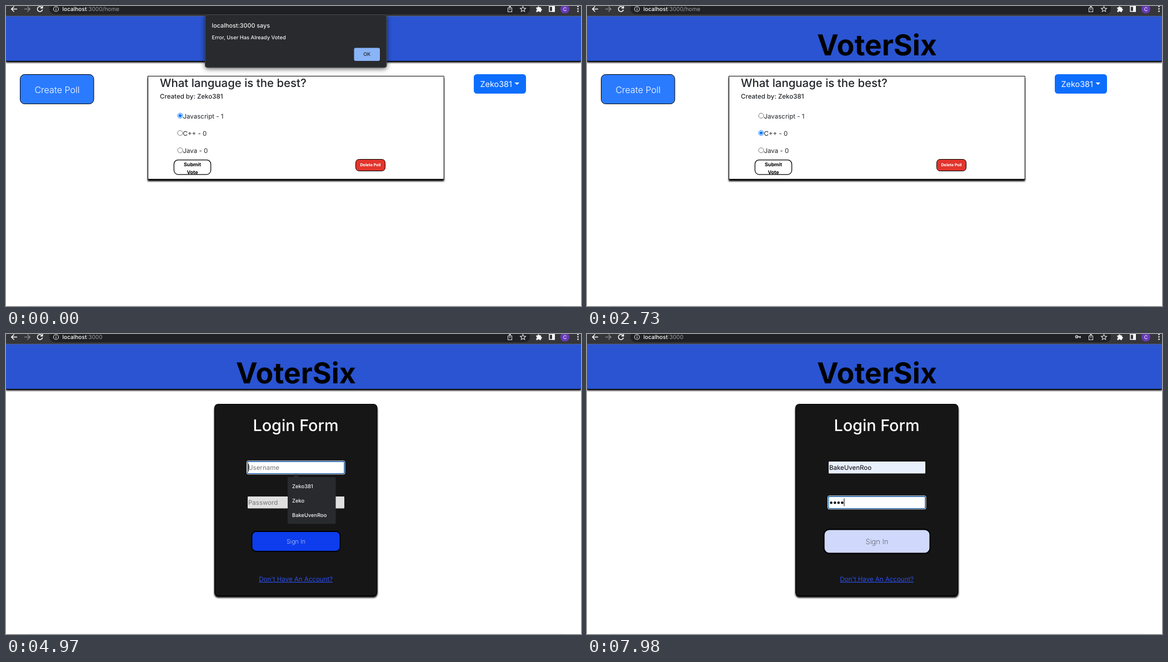
These frames come from a looping animation (1035x541 px, 8 s). An HTML page:

```html
<!DOCTYPE html>
<html lang="en">
<head>
<meta charset="utf-8">
<title>Poll app</title>
<style>
html, body { margin: 0; width: 100%; height: 100%; overflow: hidden; background: #fff; }
svg { display: block; font: 400 11.52px Inter, sans-serif; font-optical-sizing: none; text-rendering: geometricPrecision; }
text { fill: #212529; white-space: pre; }
.mid { text-anchor: middle; }
.shadow { filter: drop-shadow(0 3px 1.5px #000); }
.heading { font-weight: 500; }
.white { fill: #fff; }
.small { font-size: 7.2px; font-weight: 700; }
.menu text { font-size: 9.36px; font-weight: 500; fill: #f4f4f4; }
.line { fill: none; stroke: #dfe1e5; stroke-width: 1.5; }
.hint { fill: #757575; }
</style>
</head>
<body>
<svg width="1035" height="541" viewBox="0 0 1035 541">
  <rect width="1035" height="541" fill="#fff"/>
  <path d="M42 540.5H1002" stroke="#f1f1f1"/>

  <!-- browser bar -->
  <rect width="1035" height="18.5" fill="#35363a"/>
  <rect y="17.5" width="1035" height="1" fill="#4b4c50"/>
  <rect x="78" y="-5" width="865" height="20" rx="10" fill="#202124"/>
  <g class="line">
    <path d="M20 5.5H10M14.5 .8L9.8 5.5L14.5 10.2" stroke="#fff"/>
    <path d="M33 5.5H43M38.5 .8L43.2 5.5L38.5 10.2" stroke="#85878a"/>
    <path d="M64.8 2.8A4.6 4.6 0 1 0 65.6 6.5M65.8 0V3.8H62" stroke="#fff"/>
    <g stroke-width="1.1">
      <circle cx="90" cy="5.5" r="4.5"/>
      <path d="M90 4.8V8.2M90 2.6V3.8M905.2 3.5H903.5V10.5H910.5V3.5H908.8M907 7.5V.5M904.8 2.5L907 .3L909.2 2.5"/>
      <path d="M930.5 .6L931.9 3.9L935.5 4.2L932.8 6.5L933.6 10L930.5 8.1L927.4 10L928.2 6.5L925.5 4.2L929.1 3.9Z"/>
    </g>
    <rect x="978" y=".7" width="9" height="9" stroke="#fff"/>
  </g>
  <path class="white" d="M983 0H988V10.5H983ZM954.5 2.5H957A1.7 1.7 0 0 1 960.4 2.5H963V5A1.7 1.7 0 0 1 963 8.4V10.8H960.3A1.7 1.7 0 0 0 957 10.8H954.5V8.2A1.7 1.7 0 0 0 954.5 4.9Z"/>
  <circle cx="1006" cy="5.5" r="8" fill="#673ab7"/>
  <text class="mid white" x="1006" y="8.8" font-size="9">C</text>
  <path d="M1029.5 1V1.01M1029.5 5.3V5.31M1029.5 9.6V9.61" stroke="#fff" stroke-width="2.6" stroke-linecap="round"/>
  <g id="key" fill="none" stroke="#dfe1e5">
    <circle cx="881.5" cy="5" r="2" stroke-width="1.5"/>
    <path d="M883.5 5H889M887.5 5V7.5" stroke-width="1.6"/>
  </g>
  <text x="101.5" y="9" font-size="10.08" style="fill:#9aa0a6"><tspan fill="#fff" font-weight="500">localhost</tspan>:3000<tspan id="path">/home</tspan></text>

  <!-- page header -->
  <rect class="shadow" y="18.5" width="1035" height="80.5" fill="#2a54d1"/>
  <path d="M0 99.5H1035" stroke="#000"/>
  <text class="mid" x="522" y="89" font-size="51.84" font-weight="700" style="fill:#000">VoterSix</text>

  <g id="home">
    <rect x="25.5" y="123.5" width="132.5" height="53" rx="8" fill="#2b7bff" stroke="#000"/>
    <text class="mid white" x="92" y="157.3" font-size="16.13" font-weight="340">Create Poll</text>
    <rect x="842" y="123" width="94" height="35" rx="5.5" fill="#0d6efd"/>
    <text class="white" x="853.5" y="145.7" font-size="14.4">Zeko381</text>
    <path class="white" d="M915.5 138H924L919.75 142.3Z"/>
    <g id="logout">
      <rect x="842" y="158.5" width="115.5" height="35" rx="4" fill="#fff" stroke="#d3d4d6"/>
      <rect id="logoutRow" x="842" y="164" width="115.5" height="24" fill="#0d6efd"/>
      <text x="853.5" y="180" text-decoration="underline" style="fill:#0a58ca">Logout</text>
    </g>
    <rect class="shadow" x="255" y="126" width="533.5" height="187" fill="#000"/>
    <rect x="256" y="127" width="531.7" height="184.8" fill="#fff"/>
    <text class="heading" x="277" y="145.7" font-size="20.4">What language is the best?</text>
    <text class="heading" x="277" y="167">Created by: Zeko381</text>
    <g id="options"></g>
    <g id="submit">
      <rect x="-26.5" y="-10.5" width="53" height="21" rx="6" stroke="#000"/>
      <text class="mid small" y="-1">Submit</text>
      <text class="mid small" y="9.8">Vote</text>
    </g>
    <rect x="629.5" y="276.5" width="53" height="21" rx="6" fill="#e2352d" stroke="#000"/>
    <text class="mid small white" x="656" y="289.3">Delete Poll</text>
  </g>

  <g id="login">
    <rect class="shadow" x="375" y="126" width="293.5" height="346.5" rx="7" fill="#000"/>
    <rect x="376" y="127" width="291.5" height="344.5" rx="6" fill="#161616"/>
    <text class="mid heading white" x="521.5" y="175.3" font-size="28.8">Login Form</text>
    <rect id="userBox" x="435" y="230" width="174" height="21.5" rx="1"/>
    <text id="userText" x="436" y="245.2"></text>
    <rect id="passBox" x="435" y="293" width="174" height="21.5" rx="1"/>
    <text id="passHint" class="hint" x="436" y="307.7">Password</text>
    <g id="dots"></g>
    <g id="ring" fill="none">
      <rect x="433.5" y="228.8" width="176.5" height="24" rx="2.5" stroke="#fff"/>
      <rect x="434.7" y="230" width="174.2" height="21.6" rx="1.5" stroke="#1a66b5" stroke-width="1.4"/>
    </g>
    <rect id="caret" width="1" height="14" fill="#000"/>
    <g id="signIn">
      <rect x="-79.5" y="-18" width="159" height="36" rx="8" stroke="#000" stroke-width="1.8"/>
      <text class="mid" y="4" font-size="10.8" font-weight="200">Sign In</text>
    </g>
    <text class="mid" x="521.7" y="446" text-decoration="underline" style="fill:#2c4ff0">Don't Have An Account?</text>
    <g id="menu" class="menu">
      <path d="M516 258.5L522 252.5L528 258.5Z" fill="#292a2d"/>
      <rect x="507" y="258" width="86.5" height="84.5" rx="2" fill="#292a2d"/>
      <rect id="menuRow" x="507" width="86.5" height="26.2" fill="#45474b"/>
      <g id="names"></g>
    </g>
  </g>

  <g id="dialog">
    <rect x="358.5" y="15.5" width="326.5" height="95.5" rx="4" fill="#292a2d" stroke="#4a4c50" style="filter:drop-shadow(0 2px 4px #0009)"/>
    <text class="heading" x="370.5" y="39.2" font-size="10.8" style="fill:#f1f3f4">localhost:3000 says</text>
    <text class="heading" x="370.5" y="60.3" font-size="9.36" style="fill:#f1f3f4">Error, User Has Already Voted</text>
    <rect x="626.5" y="75.5" width="46.5" height="23.5" rx="3" fill="#8ab4f8"/>
    <text class="mid heading" x="649.7" y="90.4" font-size="9">OK</text>
  </g>
</svg>
<script>
const LOOP = 8000;
const $ = id => document.getElementById(id);
const show = (id, on) => $(id).setAttribute('visibility', on ? 'inherit' : 'hidden');
const set = (el, attrs) => { for (const k in attrs) el.setAttribute(k, attrs[k]); };
const users = ['Zeko381', 'Zeko', 'BakeUvenRoo'];

$('options').innerHTML = ['Javascript - 1', 'C++ - 0', 'Java - 0'].map((label, i) => {
  const y = 197.8 + 31.2 * i;
  return `<circle cx="313.5" cy="${y}" r="4.5" fill="#fff"/>
    <circle cx="313.5" cy="${y}" r="2.8" fill="#0075ff"/>
    <text x="318.5" y="${y + 5.2}">${label}</text>`;
}).join('');
$('names').innerHTML = users.map((name, i) =>
  `<text x="515" y="${277.7 + 26.2 * i}">${name}</text>`).join('');
$('dots').innerHTML = [0, 1, 2, 3].map(i =>
  `<circle cx="${439.6 + 6.6 * i}" cy="304.2" r="2.2"/>`).join('');

// CSS "ease": cubic-bezier(.25, .1, .25, 1)
function ease(x) {
  if (x <= 0) return 0;
  if (x >= 1) return 1;
  let lo = 0, hi = 1, s;
  for (let i = 0; i < 20; i++) {
    s = (lo + hi) / 2;
    const bx = .75 * s * (1 - s) + s ** 3;
    if (bx < x) lo = s; else hi = s;
  }
  return .3 * s * (1 - s) ** 2 + 3 * s * s * (1 - s) + s ** 3;
}
const mix = (a, b, k) => `rgb(${a.map((v, i) => Math.round(v + (b[i] - v) * k))})`;
const WHITE = [255, 255, 255], BLACK = [0, 0, 0];

// Buttons grow by a quarter, turn white and get black text on hover
function hoverButton(id, x, y, color, k) {
  const g = $(id);
  set(g, { transform: `translate(${x} ${y}) scale(${1 + k / 4})` });
  set(g.firstElementChild, { fill: mix(color, WHITE, k) });
  g.querySelectorAll('text').forEach(el => el.style.fill = mix(WHITE, BLACK, k));
}

function drawHome(t) {
  const fade = start => ease((t - start) / 400);
  hoverButton('submit', 335.5, 290.7, [34, 34, 34], 1 - fade(460) + fade(1792) - fade(3290));
  const chosen = t < 1330 ? 0 : 1;
  const circles = $('options').querySelectorAll('circle');
  for (let i = 0; i < 3; i++) {
    set(circles[2 * i], { stroke: i === chosen ? '#0075ff' : '#767676' });
    set(circles[2 * i + 1], { visibility: i === chosen ? 'inherit' : 'hidden' });
  }
  show('logout', t >= 3850);
  show('logoutRow', t >= 4060);
}

function drawLogin(t) {
  const picked = t >= 6090;
  const row = t < 5320 ? -1 : t < 5460 ? 0 : t < 5600 ? 1 : 2;
  const onUser = t >= 4970 && t < 6510, onPass = t >= 6510;
  const typed = [7140, 7350, 7490, 7630].filter(at => t >= at).length;

  $('userText').textContent = row < 0 ? 'Username' : users[row];
  $('userText').style.fill = row < 0 ? '#757575' : '#000';
  set($('userBox'), { fill: row >= 0 ? '#e8f0fe' : onUser ? '#fff' : '#e0e0e0' });
  set($('passBox'), { fill: onPass ? '#fff' : '#e0e0e0' });
  show('passHint', !typed);
  [...$('dots').children].forEach((dot, i) => set(dot, { visibility: i < typed ? 'inherit' : 'hidden' }));

  show('ring', onUser || onPass);
  set($('ring'), { transform: `translate(0 ${onPass ? 63 : 0})` });
  show('caret', onPass || onUser && (row < 0 || picked));
  const caretX = onPass ? 436 + 6.6 * typed
    : picked ? 436 + $('userText').getComputedTextLength() : 436;
  set($('caret'), { x: caretX, y: onPass ? 296.5 : 233.8 });

  show('menu', onUser && !picked);
  show('menuRow', onUser && !picked && row >= 0);
  set($('menuRow'), { y: 261 + 26.2 * Math.max(row, 0) });
  hoverButton('signIn', 522, 374, [13, 61, 236], ease((t - 7780) / 400));
}

function draw() {
  const t = performance.now() % LOOP;
  const atLogin = t >= 4340;
  show('home', !atLogin);
  show('login', atLogin);
  show('path', !atLogin);
  show('key', t >= 7140);
  show('dialog', t < 70 || t >= 2240 && t < 2730);
  if (atLogin) drawLogin(t); else drawHome(t);
  requestAnimationFrame(draw);
}
draw();
</script>
</body>
</html>
```
